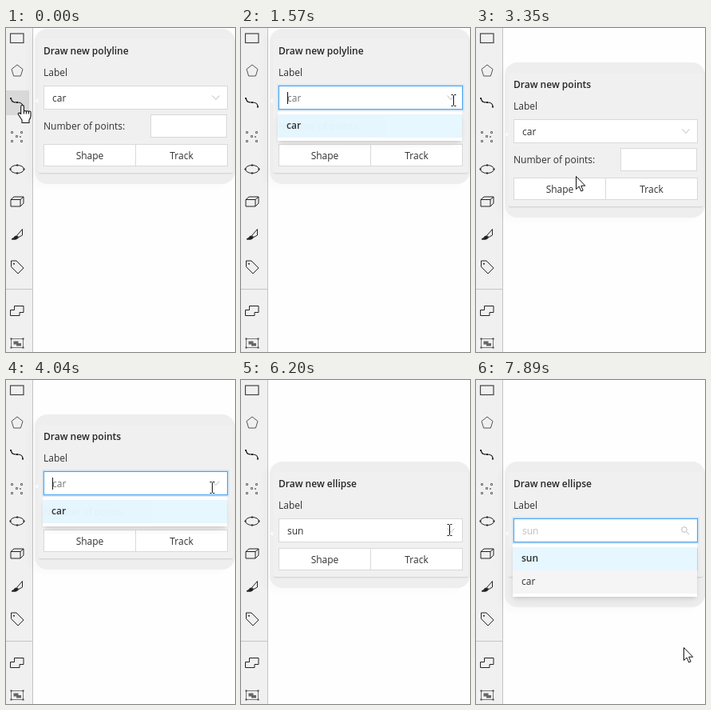
Write an HTML page that moves like this. It is 287 px wide and 405 px high and loops after 8 s.

```html
<!DOCTYPE html>
<html lang="en">
<head>
<meta charset="utf-8">
<title>Drawing tools</title>
<style>
html, body { margin: 0; width: 100%; height: 100%; overflow: hidden; background: #fefefe; }
body { position: relative; font: 12px/16px "Open Sans", "Noto Sans", sans-serif; color: #303030; }
div, svg { position: absolute; box-sizing: border-box; }
#bar { left: 0; top: 0; width: 34px; height: 405px; background: #f0f0f0; border-right: 1px solid #c4c4c4; }
#glow { left: 0; width: 29px; height: 31px; background: #d9d9d9; }
#stage { left: 0; top: 0; width: 287px; height: 405px; overflow: hidden; }
.pop { left: 0; width: 287px; height: 200px; }
.shade { left: 36px; top: 1px; width: 251px; background: #eee; border-radius: 16px; box-shadow: -8px 4px 8px rgba(0,0,0,.02); }
.panel { left: 40px; top: 14px; width: 245px; background: #f0f0f0; border-radius: 3px; box-shadow: 0 2px 2px -1px rgba(0,0,0,.14); }
.tip { left: 36px; top: 88px; border: 3px solid transparent; border-left: 0; border-right: 4px solid #fafafa; }
.title { left: 47px; top: 21px; font-weight: 600; color: #262626; white-space: nowrap; }
.label { left: 47px; top: 48px; }
.select { left: 47px; top: 72px; width: 231px; height: 30px; background: #fff; border: 1px solid #d9d9d9; }
.select.on { border-color: #4aa3f0; box-shadow: 0 0 0 1.5px rgba(24,144,255,.2); }
.value { left: 10px; top: 7px; }
.caret { left: 10px; top: 7px; width: 1px; height: 15px; background: #111; }
.mark { left: 207px; top: 7px; width: 14px; height: 14px; fill: none; stroke: #bbb; }
.count { left: 47px; top: 115px; white-space: nowrap; }
.input { left: 181px; top: 108px; width: 96px; height: 29px; background: #fff; border: 1px solid #d9d9d9; }
.btn { width: 116px; height: 28px; background: #fff; border: 1px solid #d9d9d9; text-align: center; line-height: 27px; }
.list { left: 46px; top: 104px; width: 231px; padding: 4px 0; background: #fff; transform-origin: 0 0;
  box-shadow: 0 3px 5px -2px rgba(0,0,0,.15), 0 5px 12px rgba(0,0,0,.06); }
.row { position: relative; height: 29px; padding-left: 11px; line-height: 28px; }
.row:first-child { background: #e6f7ff; font-weight: 600; }
</style>
</head>
<body>
<div id="stage">
  <div id="bar"></div>
  <div id="glow"></div>
  <svg width="34" height="405" fill="none" stroke="#222">
    <rect x="5.500" y="7" width="16.500" height="11.500" stroke="#444" stroke-width="1.2"/>
    <path d="M14 46L21 51.500 18.400 60H9.600L7 51.500z" stroke="#555"/>
    <path d="M6.500 88c0 5 4 5 7.500 5s7 1 7 5" stroke-width="1.2"/>
    <path d="M5 87h2v2h-2zM13 92h2v2h-2zM20 97.500h2v2h-2z" fill="#222" stroke="none"/>
    <path d="M6.500 129.500h2v2h-2zM18.500 129.500h2v2h-2zM12.500 134.500h2v2h-2zM6.500 140.500h2v2h-2zM18.500 140.500h2v2h-2zM17.500 135.500h1v1h-1z" stroke="#666"/>
    <ellipse cx="14" cy="176.500" rx="8.500" ry="5"/>
    <path d="M4.500 175.500h2v2h-2zM21.500 175.500h2v2h-2zM13 170.500h2v2h-2zM13 180.500h2v2h-2z" fill="#222" stroke="none"/>
    <path d="M6 214.500H18V223H6zM6 214.500L10 211H22L18 214.500M22 211V219L18 223"/>
    <path d="M20.500 251.500L13.500 259.500l2.500 2L20.500 259z"/>
    <path d="M13 260l2.500 2c-2 2.500-4.500 2.500-8.500 2 3-1 3-4 6-4z" fill="#222"/>
    <path d="M6.500 291h6.500l9 9-7 7-8.500-8.500z"/>
    <circle cx="10" cy="294.700" r="1" fill="#222" stroke="none"/>
    <path d="M0 326.500H33" stroke="#c4c4c4"/>
    <path d="M10.500 347.500H22V355.500H17V359.500H5.500V352.500H10.500z"/>
    <rect x="6.500" y="388.500" width="15" height="11" stroke="#777"/>
    <path d="M9.500 391.500h6v4h-6zM13 394h6v3.500h-6z" fill="#666" stroke="none"/>
    <path d="M5.500 387.500h2v2h-2zM20.500 387.500h2v2h-2zM5.500 398.500h2v2h-2zM20.500 398.500h2v2h-2z" fill="#444" stroke="none"/>
  </svg>
  <div id="pops"></div>
  <svg width="287" height="405" stroke-linejoin="round">
    <g id="hand" fill="#fff" stroke="#111" stroke-width="1.1">
      <path d="M0 0c-1 0-1.800.8-1.800 1.800V11L-3 10c-1.300-1-3 .2-2 1.700L-.5 18.500V22H8.500V18.500c1.200-1.500 2-3 2-5V8.800c0-1.700-2.500-1.700-2.700-.3-.2-1.600-2.700-1.600-2.900-.4-.2-1.500-2.800-1.500-3-.3V1.800C1.900.8 1 0 0 0z"/>
      <path d="M1.900 7.500V11M4.900 8V11M7.800 8.500V11" fill="none"/>
    </g>
    <path id="arrow" d="M0 0V16L3.700 12.500 6.300 18.500 8.700 17.500 6.200 11.700H11.300z" fill="#fff" stroke="#111"/>
    <path id="beam" d="M-3 -7H-1L0 -6 1 -7H3M0 -6V6M-3 7H-1L0 6 1 7H3" fill="none" stroke="#111"/>
  </svg>
</div>
<script>
const LOOP = 8000;
const $ = id => document.getElementById(id);

// Bursts of evenly spaced picture changes: start, end, steps
const bursts = [[0, 0, 1], [120, 1060, 8], [1180, 2200, 9], [2350, 2500, 2], [2800, 3800, 8],
  [4040, 4950, 8], [5100, 5250, 2], [5660, 6590, 8], [6720, 6840, 2], [7360, 7360, 1], [7640, 7890, 3]];
const ticks = bursts.flatMap(([a, b, n]) =>
  Array.from({ length: n }, (_, i) => Math.floor((a + (n > 1 ? (b - a) * i / (n - 1) : 0)) / 10) * 10));

// Pointer route: time, x, y, shape
const route = [
  [0, 20, 96, "hand"], [110, 20, 96, "arrow"], [380, 75, 130, "arrow"], [520, 128, 144, "arrow"],
  [650, 185, 128, "beam"], [790, 232, 106, "beam"], [1060, 266, 90, "beam"], [1600, 266, 90, "beam"],
  [1810, 180, 76, "arrow"], [1940, 85, 80, "arrow"], [2060, 22, 95, "hand"], [2200, 15, 113, "hand"],
  [2350, 12, 128, "hand"], [2500, 12, 132, "hand"], [2790, 12, 132, "arrow"], [3080, 70, 172, "arrow"],
  [3220, 125, 185, "arrow"], [3370, 190, 168, "beam"], [3510, 235, 146, "beam"], [3650, 258, 134, "beam"],
  [4160, 258, 134, "beam"], [4300, 215, 108, "arrow"], [4550, 120, 88, "arrow"], [4680, 65, 102, "arrow"],
  [4810, 20, 130, "hand"], [4950, 14, 148, "hand"], [5100, 10, 172, "hand"], [5250, 10, 181, "hand"],
  [5650, 10, 181, "arrow"], [5790, 62, 165, "arrow"], [5920, 130, 163, "arrow"], [6050, 205, 176, "beam"],
  [6190, 261, 187, "beam"], [6590, 261, 187, "beam"], [6720, 252, 203, "hand"], [6840, 246, 216, "hand"],
  [7350, 246, 216, "hand"], [7360, 274, 232, "hand"], [7640, 271, 250, "hand"], [7760, 266, 297, "arrow"],
  [7890, 260, 334, "arrow"], [LOOP, 260, 334, "arrow"]];

// Highlighted tool: from, to, top
const hovers = [[0, 120, 78], [2060, 2350, 78], [2350, 2800, 120], [4810, 5100, 120], [5100, 5660, 161]];

const pops = [
  { name: "polyline", y: 0, items: ["car"], from: -1, to: 2350, focus: 1180, open: 1430, dim: 1690, blinks: [[1180, 1820]] },
  { name: "points", y: 42, items: ["car"], from: 2350, to: 5100, focus: 3800, open: 3900, dim: 4160, blinks: [[3800, 4430]] },
  { name: "ellipse", y: 101, items: ["sun", "car"], from: 5100, to: 9000, focus: 6320, open: 6450, dim: 6720,
    blinks: [[6320, 6840], [7360, 7890]] }];

const chevron = '<path d="M3.500 4.500L8 9.500 12.500 4.500"/>';
const lens = '<circle cx="6" cy="6" r="3.300"/><path d="M8.500 8.500L12 12"/>';

for (const p of pops) {
  p.pair = p.items.length > 1;
  const cut = p.pair ? 36 : 0;
  p.height = 194 - cut;
  const btn = (x, text) => `<div class="btn" style="left:${x}px;top:${145 - cut}px">${text}</div>`;
  p.el = document.createElement("div");
  p.el.className = "pop";
  p.el.style.top = p.y + "px";
  p.el.innerHTML = `<div class="shade"></div><div class="panel" style="height:${167 - cut}px"></div>
    <div class="tip"></div><div class="title">Draw new ${p.name}</div><div class="label">Label</div>
    <div class="select"><div class="value">${p.items[0]}</div><div class="caret"></div>
    <svg class="mark" viewBox="0 0 14 14"></svg></div>
    ${cut ? "" : '<div class="count">Number of points:</div><div class="input"></div>'}
    ${btn(47, "Shape")}${btn(162, "Track")}
    <div class="list">${p.items.map(s => `<div class="row">${s}</div>`).join("")}</div>`;
  $("pops").append(p.el);
  for (const c of ["shade", "select", "value", "caret", "mark", "list"]) p[c] = p.el.querySelector("." + c);
  p.last = p.el.querySelector(".row:last-child");
}

const within = (t, [a, b]) => t >= a && t < b;
const show = (el, on) => el.style.display = on ? "" : "none";

function drawPop(p, t) {
  const shown = t >= p.from && t <= p.to;
  show(p.el, shown);
  if (!shown) return;
  p.el.style.opacity = t === p.to ? .4 : t === p.from ? .6 : 1;
  const focused = t >= p.focus, dimmed = t >= p.dim, opened = t >= p.open;
  const settled = t >= p.open + 120;
  p.select.classList.toggle("on", focused);
  p.value.style.color = dimmed ? "#bfbfbf" : focused ? "#747474" : "";
  show(p.caret, p.blinks.some(s => within(t, s)));
  p.mark.innerHTML = dimmed ? lens : chevron;
  show(p.list, opened);
  p.list.style.opacity = dimmed ? 1 : settled ? .97 : .5;
  p.list.style.transform = settled ? "" : "scaleY(.85)";
  p.shade.style.height = (opened && p.pair ? 182 : p.height) + "px";
  if (p.pair) p.last.style.background = t >= 7640 ? "#f5f5f5" : "";
}

function drawCursor(t) {
  const i = route.findLastIndex(k => k[0] <= t);
  const a = route[i], b = route[i + 1] || a;
  const u = b === a ? 0 : (t - a[0]) / (b[0] - a[0]);
  const at = n => Math.round(a[n] + (b[n] - a[n]) * u) + .5;
  for (const id of ["hand", "arrow", "beam"]) show($(id), id === a[3]);
  $(a[3]).setAttribute("transform", `translate(${at(1)} ${at(2)})`);
}

function draw(now) {
  const time = now % LOOP;
  const t = ticks.findLast(k => k <= time);
  const hover = hovers.find(h => within(t, h));
  show($("glow"), hover);
  if (hover) $("glow").style.top = hover[2] + "px";
  for (const p of pops) drawPop(p, t);
  drawCursor(t);
}

const start = performance.now();
function loop() {
  draw(performance.now() - start);
  requestAnimationFrame(loop);
}
loop();
</script>
</body>
</html>
```
